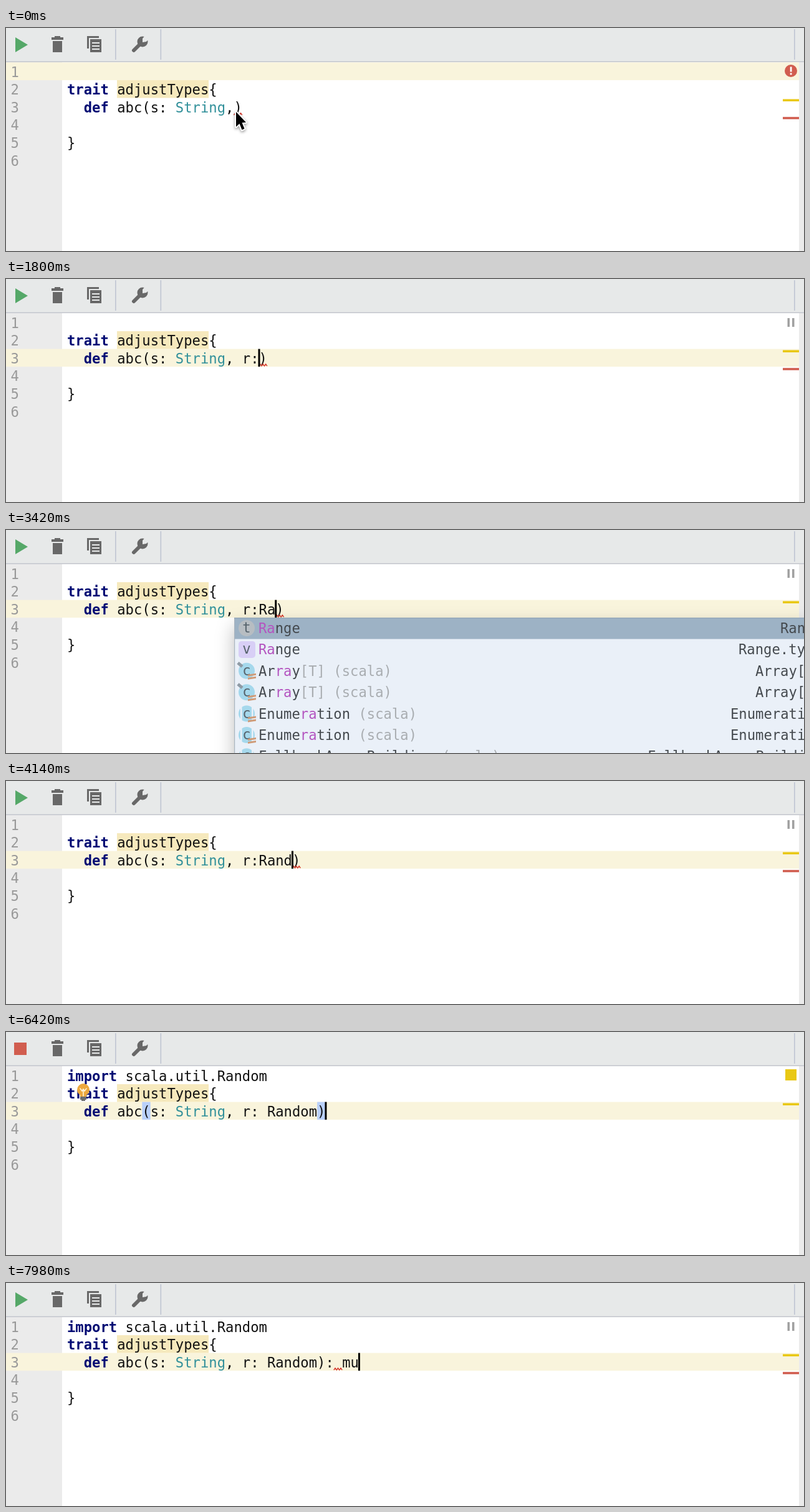
An HTML page with a canvas that plays this animation: 1280 px wide and 359 px high, repeating every 8 s.

```html
<!DOCTYPE html>
<html lang="en">
<head>
<meta charset="utf-8">
<title>Editor typing</title>
<style>
  html, body { margin: 0; width: 100%; height: 100%; overflow: hidden; background: #fff; }
  canvas { display: block; }
</style>
</head>
<body>
<canvas id="stage" width="1280" height="359"></canvas>
<script>
const g = document.getElementById('stage').getContext('2d');
const LOOP = 8000, CELL = 13.37, LEFT = 98, PITCH = 28.6;
const FONT = '22.2px "DejaVu Sans Mono", monospace';
const INK = '#111', KEY = '#000a73', TYPE = '#31909a', ICON = '#686868', RED = '#d15d4f', YELLOW = '#e9c814';
const HEAD = '  def abc(s: String,';

const rowTop = n => 55.4 + PITCH * (n - 1);
const colX = c => LEFT + CELL * c;

// Each state: start time, text after HEAD, then what differs from the defaults.
const states = [
  [0, ')', { row: 1, noCaret: true, status: 'error', mouse: true, wave: 20 }],
  [480, ')', { status: 'error', mouse: true, wave: 20 }],
  [900, ' )', { wave: 20 }],
  [1260, ' r)', { wave: 20 }],
  [1620, ' r:)', {}],
  [1920, ' r:R)', {}],
  [2160, ' r:Rn)', {}],
  [2340, ' r:Rna)', {}],
  [2760, ' r:Rn)', {}],
  [2940, ' r:R)', {}],
  [3180, ' r:Ra)', {}],
  [3420, ' r:Ra)', { popup: true }],
  [3900, ' r:Ran)', {}],
  [4080, ' r:Rand)', {}],
  [4260, ' r:Rando)', {}],
  [4440, ' r:Random)', {}],
  [5940, ' r:Random)', { imported: true, wave: -1 }],
  [6180, ' r: Random)', { imported: true, wave: -1, atEnd: true, status: 'warn', busy: true, matched: true }],
  [7020, ' r: Random):', { imported: true, atEnd: true, busy: true, wave: 31 }],
  [7320, ' r: Random): ', { imported: true, atEnd: true, busy: true, wave: 32 }],
  [7620, ' r: Random): m', { imported: true, atEnd: true, wave: 32 }],
  [7860, ' r: Random): mu', { imported: true, atEnd: true, wave: 32 }]
];

function rect(x, y, w, h, color) {
  g.fillStyle = color;
  g.fillRect(x, y, w, h);
}

function shape(points, color) {
  g.fillStyle = color;
  g.beginPath();
  points.forEach(([x, y]) => g.lineTo(x, y));
  g.closePath();
  g.fill();
}

function disc(x, y, r, color) {
  g.fillStyle = color;
  g.beginPath();
  g.arc(x, y, r, 0, 7);
  g.fill();
}

// Monospaced text on the character grid; returns the x after it.
function type(text, x, base, color = INK, bold = false) {
  g.font = (bold ? 'bold ' : '') + FONT;
  g.fillStyle = color;
  for (const ch of text) {
    g.fillText(ch, x, base);
    x += CELL;
  }
  return x;
}

function code(row, col, text, color, bold) {
  type(text, colX(col), rowTop(row) + 23.2, color, bold);
}

function toolbar(busy) {
  rect(0, 0, 1280, 54, '#e7e9e9');
  rect(0, 53.5, 1280, 1.5, '#c3c6cd');
  for (const x of [175, 247.5, 1264]) rect(x, 2, 1.6, 49, '#bfc5d2');

  if (busy) rect(13, 17, 20, 20, RED);
  else shape([[15, 15], [35, 27], [15, 39]], '#55a868');

  // Bin
  rect(78, 13, 9, 3, ICON);
  rect(73, 15, 19, 4, ICON);
  rect(75, 21, 15, 18, ICON);

  // Copy
  rect(130, 13, 19, 3, ICON);
  rect(130, 13, 3, 20, ICON);
  rect(135, 18, 18, 21, ICON);
  for (const y of [23, 28, 33]) rect(138, y, 12, 2, '#e7e9e9');

  // Spanner
  g.strokeStyle = ICON;
  g.lineCap = 'round';
  g.lineWidth = 6;
  g.beginPath();
  g.moveTo(205, 36);
  g.lineTo(217, 24);
  g.stroke();
  disc(219, 22, 8.5, ICON);
  shape([[219, 23], [219, 17], [224, 11], [230, 17], [225, 22]], '#e7e9e9');
}

function wave(col) {
  const x = colX(col), y = rowTop(3) + 26;
  g.strokeStyle = '#d6382c';
  g.lineWidth = 1.5;
  g.lineCap = 'butt';
  g.beginPath();
  for (let i = 0; i <= 6; i++) g.lineTo(x + i * CELL / 6, y + (i % 2 ? -1.5 : 1.5));
  g.stroke();
}

function status(kind) {
  if (kind === 'error') {
    disc(1259, 69, 10, RED);
    rect(1257.7, 62.5, 2.8, 8, '#fff');
    rect(1257.7, 72.5, 2.8, 2.8, '#fff');
  } else if (kind === 'warn') {
    rect(1250, 60, 18, 18, YELLOW);
  } else {
    rect(1253.5, 63, 3.5, 14, '#a0a0a0');
    rect(1261, 63, 3.5, 14, '#a0a0a0');
  }
  rect(1246, 114.5, 26, 3.6, YELLOW);
  if (kind !== 'warn') rect(1246, 143.2, 26, 3.6, RED);
}

function bulb() {
  disc(124, 93, 10, '#eda83d');
  rect(119, 100, 10, 4, '#eda83d');
  rect(119, 104, 10, 5, '#6e6e6e');
  rect(121, 109, 6, 2, '#6e6e6e');
  g.strokeStyle = '#fff3d5';
  g.lineWidth = 1.6;
  g.beginPath();
  [[119, 91], [122, 95], [124, 92], [126, 95], [129, 91]].forEach(p => g.lineTo(...p));
  g.moveTo(124, 94);
  g.lineTo(124, 103);
  g.stroke();
}

function pointer(x, y) {
  const outline = [[0, 0], [0, 24], [5.5, 19], [9.5, 29], [13.5, 27], [9.5, 17.5], [16, 17]];
  g.save();
  g.translate(x, y);
  g.shadowColor = '#0006';
  g.shadowBlur = 4;
  g.shadowOffsetY = 2;
  g.strokeStyle = '#fff';
  g.lineWidth = 4;
  g.lineJoin = 'round';
  g.beginPath();
  outline.forEach(p => g.lineTo(...p));
  g.closePath();
  g.stroke();
  g.restore();
  shape(outline.map(([a, b]) => [x + a, y + b]), '#000');
}

// name, match position, grey suffix, type at right, its x, badge
const choices = [
  ['Range', 0, '', 'Range', 1242, 't'],
  ['Range', 0, '', 'Range.type', 1175, 'v'],
  ['Array', 2, '[T] (scala)', 'Array[T]', 1202, 'c'],
  ['Array', 2, '[T] (scala)', 'Array[T]', 1202, 'c'],
  ['Enumeration', 5, ' (scala)', 'Enumeration', 1162, 'o'],
  ['Enumeration', 5, ' (scala)', 'Enumeration', 1162, 'o'],
  ['FallbackArrayBuilding', 9, ' (scala)', 'FallbackArrayBuilding', 1029, 'o']
];

function badge(kind, y) {
  if (kind === 'v') {
    g.fillStyle = '#d8cff6';
    g.beginPath();
    g.roundRect(373, y - 13.5, 27, 27, 5);
    g.fill();
  } else {
    disc(386, y, 13, kind === 't' ? '#b7bdc2' : '#a5d8ec');
  }
  if (kind === 'c') {
    g.strokeStyle = '#8f9ba5';
    g.lineWidth = 5;
    g.beginPath();
    g.moveTo(372, y - 13);
    g.lineTo(379, y - 7);
    g.stroke();
  }
  if (kind === 'o') {
    rect(376, y - 13, 2.5, 26, '#eaf0f8');
    rect(394, y - 13, 2.5, 26, '#eaf0f8');
  }
  type(kind === 'o' ? 'c' : kind, 379.3, y + 7, '#56636c');
  if (kind === 'c' || kind === 'o') {
    for (const d of [4, 9]) shape([[388, y + d + 2], [401, y + d], [401, y + d + 3], [388, y + d + 5]], '#cf9b78');
  }
}

function popup() {
  g.save();
  g.shadowColor = '#0004';
  g.shadowBlur = 28;
  g.shadowOffsetY = 12;
  rect(366, 141.5, 930, 260, '#eaf0f8');
  g.restore();
  rect(366, 141.5, 914, 34, '#9db2c5');
  rect(366, 141.5, 1.2, 218, '#a9b4bf');
  rect(366, 141.2, 914, 1.2, '#8fa2b3');
  choices.forEach(([name, at, suffix, result, x, kind], i) => {
    const y = 158 + 34.4 * i, base = y + 8, dark = '#454a4f';
    badge(kind, y);
    let end = type(name.slice(0, at), 405, base, dark);
    end = type(name.slice(at, at + 2), end, base, '#b455c0');
    end = type(name.slice(at + 2), end, base, dark);
    type(suffix, end, base, '#a9adb1');
    type(result, x, base, dark);
  });
}

function draw(t) {
  const [start, tail, opt] = states.findLast(s => s[0] <= t);
  const line = HEAD + tail, last = line.length - 1;
  const row = opt.row || 3;

  rect(0, 0, 1280, 359, '#fff');
  rect(0, 55, 90, 304, '#ebebeb');
  rect(1272, 55, 8, 304, '#ebebeb');
  rect(0, rowTop(row), 1272, PITCH, '#f9f4dc');
  rect(178, rowTop(2), CELL * 11, PITCH, '#f6e9bd');
  toolbar(opt.busy);

  for (let n = 1; n <= 6; n++) type(String(n), 7.5, rowTop(n) + 23.2, '#999');

  if (opt.matched) for (const c of [9, last]) rect(colX(c), rowTop(3), CELL, PITCH, '#b9d0fa');
  if (opt.imported) {
    code(1, 0, 'import', KEY, true);
    code(1, 7, 'scala.util.Random');
  }
  code(2, 0, 'trait', KEY, true);
  code(2, 6, 'adjustTypes{');
  code(3, 2, 'def', KEY, true);
  code(3, 6, 'abc(s:');
  code(3, 13, 'String', TYPE);
  code(3, 19, ',' + tail);
  code(5, 0, '}');

  const mark = opt.wave ?? last;
  if (mark >= 0) wave(mark);
  status(opt.status);
  if (opt.matched) bulb();
  if (!opt.noCaret && (t - start) % 1000 < 500) {
    rect(colX(opt.atEnd ? last + 1 : last) - 1, rowTop(3), 3, PITCH, '#000');
  }
  if (opt.popup) popup();
  if (opt.mouse) pointer(369, 135);
}

const begin = performance.now();
function tick() {
  draw((performance.now() - begin) % LOOP);
  requestAnimationFrame(tick);
}
tick();
</script>
</body>
</html>
```
